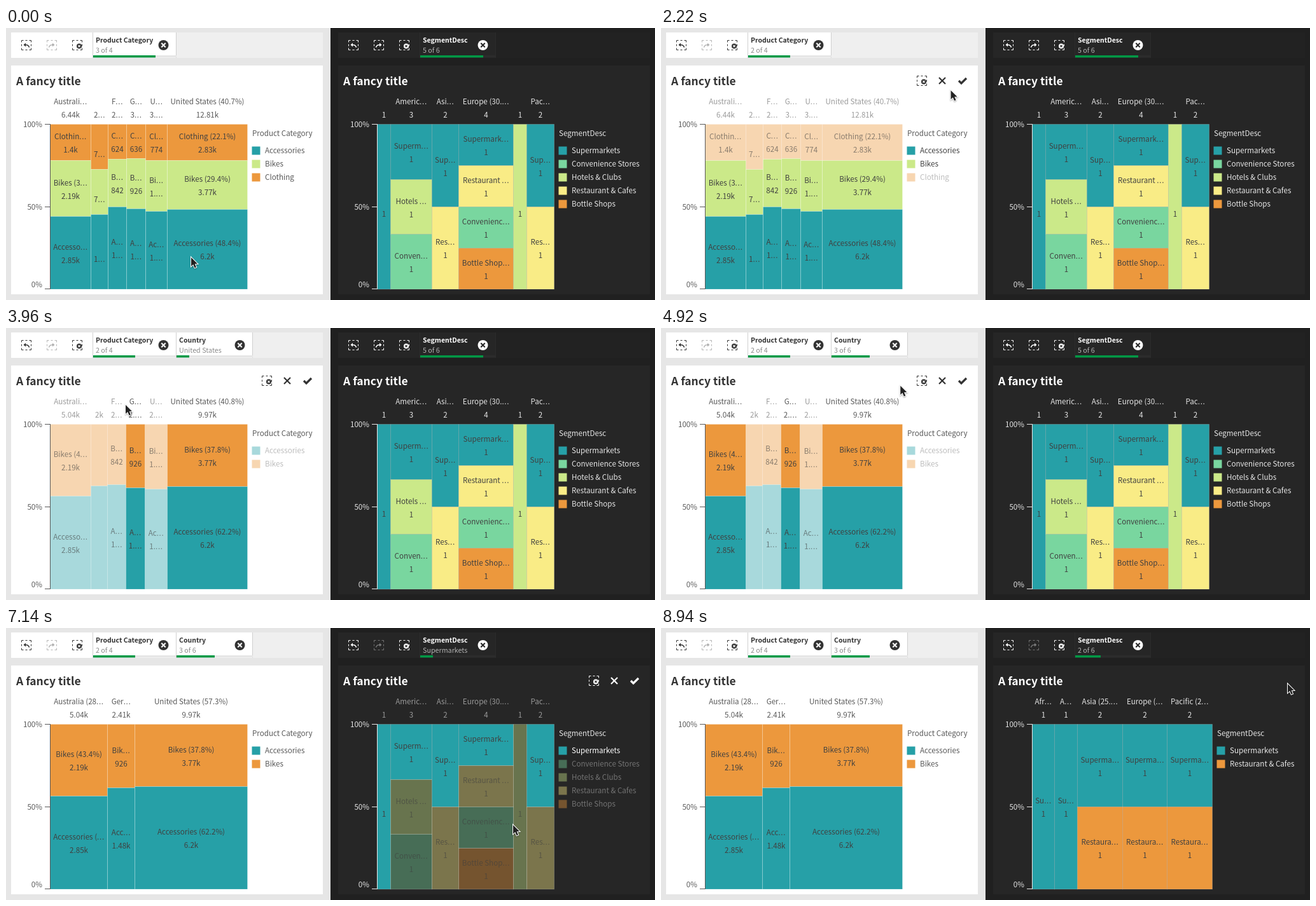
An HTML page with a canvas that plays this animation: 1020 by 428 pixels, repeating every 9 s.

```html
<!DOCTYPE html>
<html lang="en">
<head>
<meta charset="utf-8">
<title>Mekko chart selections</title>
<style>
  html, body { margin: 0; width: 100%; height: 100%; overflow: hidden; background: #e6e6e6; }
  canvas { display: block; }
</style>
</head>
<body>
<canvas id="stage" width="1020" height="428"></canvas>
<script>
const ctx = document.getElementById('stage').getContext('2d');
const LOOP = 9000, STEP = 60, TOP = 151, HEIGHT = 260;
const FAMILY = '"Noto Sans CJK SC", "Noto Sans CJK JP", "Noto Sans", sans-serif';
const TEAL = '#26a0a7', MINT = '#79d69f', LIME = '#cbe989', YELLOW = '#f9ec86', ORANGE = '#ec983d';

const LIGHT = { x: 0, page: '#e6e6e6', bar: '#efefef', tile: '#fff', card: '#fff', title: '#333',
  ink: '#404040', text: '#595959', sub: '#8c8c8c', line: '#d0d0d0', track: '#e6e6e6' };
const DARK = { x: 514, page: '#202020', bar: '#222', tile: '#262626', card: '#262626', title: '#fff',
  ink: '#fff', text: '#e6e6e6', sub: '#b3b3b3', line: '#2c2c2c', track: '#2c2c2c' };

// Column: weight, header, total, then cells of [height, category, label, value].
const col = (weight, header, total, ...cells) => ({ weight, header, total, cells });

const threeCategories = {
  width: 310, legend: [['Accessories', TEAL], ['Bikes', LIME], ['Clothing', ORANGE]],
  cols: [
    col(64, 'Australi…', '6.44k', [57, 2, 'Clothin…', '1.4k'], [88, 1, 'Bikes (3…', '2.19k'], [115, 0, 'Accesso…', '2.85k']),
    col(27, '', '2…', [71, 2, '', '7…'], [71, 1, '', '7…'], [118, 0, '', '1…']),
    col(29, 'F…', '2…', [55, 2, 'C…', '624'], [75, 1, 'B…', '842'], [130, 0, 'A…', '1…']),
    col(30, 'G…', '3…', [54, 2, 'C…', '636'], [79, 1, 'B…', '926'], [127, 0, 'A…', '1…']),
    col(34, 'U…', '3.…', [57, 2, 'Cl…', '774'], [80, 1, 'Bi…', '1.…'], [123, 0, 'Ac…', '1.…']),
    col(126, 'United States (40.7%)', '12.81k', [57, 2, 'Clothing (22.1%)', '2.83k'],
      [77, 1, 'Bikes (29.4%)', '3.77k'], [126, 0, 'Accessories (48.4%)', '6.2k'])
  ]
};
const twoCategories = {
  width: 310, legend: [['Accessories', TEAL], ['Bikes', ORANGE]],
  cols: [
    col(64, 'Australi…', '5.04k', [113, 1, 'Bikes (4…', '2.19k'], [147, 0, 'Accesso…', '2.85k']),
    col(26, '', '2k', [97, 1, '', ''], [163, 0, '', '']),
    col(29, 'F…', '2…', [95, 1, 'B…', '842'], [165, 0, 'A…', '1…']),
    col(30, 'G…', '2.…', [100, 1, 'B…', '926'], [160, 0, 'A…', '1.…']),
    col(35, 'U…', '2.…', [102, 1, 'Bi…', '1.…'], [158, 0, 'Ac…', '1.…']),
    col(126, 'United States (40.8%)', '9.97k', [98, 1, 'Bikes (37.8%)', '3.77k'], [162, 0, 'Accessories (62.2%)', '6.2k'])
  ]
};
const threeCountries = {
  width: 310, legend: twoCategories.legend,
  cols: [
    col(90, 'Australia (28…', '5.04k', [113, 1, 'Bikes (43.4%)', '2.19k'], [147, 0, 'Accessories (…', '2.85k']),
    col(43, 'Ger…', '2.41k', [100, 1, 'Bik…', '926'], [160, 0, 'Acc…', '1.48k']),
    col(177, 'United States (57.3%)', '9.97k', [98, 1, 'Bikes (37.8%)', '3.77k'], [162, 0, 'Accessories (62.2%)', '6.2k'])
  ]
};
const pair = (weight, header, first, second, cat) =>
  col(weight, header, '2', [130, 0, first, '1'], [130, cat, second, '1']);
const fiveSegments = {
  width: 278,
  legend: [['Supermarkets', TEAL], ['Convenience Stores', MINT], ['Hotels & Clubs', LIME],
    ['Restaurant & Cafes', YELLOW], ['Bottle Shops', ORANGE]],
  cols: [
    col(1, '', '1', [260, 0, '', '1']),
    col(3, 'Americ…', '3', [86.7, 0, 'Superm…', '1'], [86.7, 2, 'Hotels …', '1'], [86.6, 1, 'Conven…', '1']),
    pair(2, 'Asi…', 'Sup…', 'Res…', 3),
    col(4, 'Europe (30.…', '4', [65, 0, 'Supermark…', '1'], [65, 3, 'Restaurant …', '1'],
      [65, 1, 'Convenienc…', '1'], [65, 4, 'Bottle Shop…', '1']),
    col(1, '', '1', [260, 2, '', '1']),
    pair(2, 'Pac…', 'Sup…', 'Res…', 3)
  ]
};
const twoSegments = {
  width: 283, legend: [['Supermarkets', TEAL], ['Restaurant & Cafes', ORANGE]],
  cols: [
    col(1, 'Afr…', '1', [260, 0, 'Su…', '1']),
    col(1, 'A…', '1', [260, 0, 'Su…', '1']),
    pair(2, 'Asia (25.…', 'Superma…', 'Restaura…', 1),
    pair(2, 'Europe (…', 'Superma…', 'Restaura…', 1),
    pair(2, 'Pacific (2…', 'Superma…', 'Restaura…', 1)
  ]
};

// Hard state changes: [time, value].
const leftChart = [[0, threeCategories], [2520, twoCategories], [5340, threeCountries]];
const rightChart = [[0, fiveSegments], [8400, twoSegments]];
const leftPick = [[0, null], [480, { cats: [0] }], [1560, { cats: [0, 1] }], [2520, null],
  [3480, { cols: [5] }], [3900, { cols: [5, 3] }], [4440, { cols: [5, 3, 0] }], [5340, null]];
const rightPick = [[0, null], [6420, { cats: [0] }], [7440, { cats: [0, 3] }], [8400, null]];
const categoryTile = [[0, ['3 of 4', 3 / 4]], [660, ['Accessories', 1 / 4]], [1740, ['2 of 4', 2 / 4]]];
const countryTile = [[0, null], [3660, ['United States', 1 / 6]], [4080, ['2 of 6', 2 / 6]], [4620, ['3 of 6', 3 / 6]]];
const segmentTile = [[0, ['5 of 6', 5 / 6]], [6600, ['Supermarkets', 1 / 6]], [7620, ['2 of 6', 2 / 6]]];
const cursorPath = [[0, 291, 361], [600, 291, 361], [1260, 288, 281], [1500, 288, 246], [1740, 288, 246],
  [2340, 475, 81], [2940, 476, 81], [3400, 315, 118], [3560, 315, 118], [3860, 188, 121], [4020, 188, 121],
  [4380, 100, 120], [4560, 100, 120], [5100, 473, 81], [5400, 473, 81], [5760, 442, 105], [6300, 752, 185],
  [6540, 752, 185], [7140, 797, 310], [7360, 838, 345], [7560, 838, 345], [8200, 990, 82], [8500, 990, 84],
  [8940, 985, 88], [9000, 985, 88]];

const at = (steps, t) => steps.filter(s => s[0] <= t).pop()[1];

function rect(x, y, w, h, color) {
  ctx.fillStyle = color;
  ctx.fillRect(x, y, w, h);
}

function line(points, color, width) {
  ctx.beginPath();
  points.forEach(p => ctx.lineTo(...p));
  ctx.strokeStyle = color;
  ctx.lineWidth = width;
  ctx.stroke();
}

// align: 0 left, 0.5 centre, 1 right. A trailing ellipsis is set as baseline dots.
function text(str, x, y, color, align = 0, size = 13, weight = 400) {
  if (!str) return;
  const body = str.replace('…', ''), dots = body === str ? 0 : 3, pitch = size * 0.3;
  ctx.font = `${weight} ${size * 0.895}px ${FAMILY}`;
  ctx.fillStyle = color;
  const width = ctx.measureText(body).width;
  x -= (width + dots * pitch) * align;
  ctx.fillText(body, x, y);
  for (let i = 0; i < dots; i++) ctx.fillText('.', x + width + i * pitch, y);
}

function faded(alpha, draw) {
  ctx.globalAlpha = alpha;
  draw();
  ctx.globalAlpha = 1;
}

function cross(x, y, r, color, width) {
  line([[x - r, y - r], [x + r, y + r]], color, width);
  line([[x + r, y - r], [x - r, y + r]], color, width);
}

function disc(x, y, r, color, back, width) {
  ctx.beginPath();
  ctx.arc(x, y, r, 0, 7);
  ctx.fillStyle = color;
  ctx.fill();
  cross(x, y, r * 0.4, back, width);
}

function dashedBox(x, y, color) {
  ctx.strokeStyle = color;
  ctx.lineWidth = 1;
  ctx.setLineDash([3, 3, 3, 3, 3, 0]);
  ctx.strokeRect(x - 7.5, y - 7.5, 15, 15);
  ctx.setLineDash([]);
}

function arrowIcon(x, y, color, dir) {
  dashedBox(x, y, color);
  ctx.save();
  ctx.translate(x, y);
  ctx.scale(dir, 1);
  ctx.beginPath();
  ctx.moveTo(-4.5, -0.5);
  ctx.lineTo(-1, -3.5);
  ctx.lineTo(-1, 2.5);
  ctx.fillStyle = color;
  ctx.fill();
  ctx.beginPath();
  ctx.moveTo(-2, -0.5);
  ctx.quadraticCurveTo(3.5, -1, 4.5, 3.5);
  ctx.lineWidth = 1.6;
  ctx.stroke();
  ctx.restore();
}

function clearIcon(x, y, color, back) {
  dashedBox(x, y, color);
  disc(x + 3, y + 1.5, 4, color, back, 1.2);
}

function tile(theme, x, width, name, [value, share]) {
  rect(x, 7, width, 40, theme.tile);
  rect(x - 1, 7, 1, 40, theme.line);
  rect(x + width - 1, 7, 1, 40, theme.line);
  rect(x, 43, width, 3.5, theme.track);
  rect(x, 43, Math.round(width * share), 3.5, '#009845');
  text(name, x + 4, 23, theme.title, 0, 11.75, 700);
  text(value, x + 4, 39, theme.sub, 0, 12);
  disc(x + width - 20.5, 27, 8, theme.title, theme.tile, 2);
}

function panel(theme, canRedo) {
  const { x } = theme;
  rect(x ? 510 : 0, 0, 510, 428, theme.page);
  rect(x + 8, 7, 490, 40, theme.bar);
  rect(x + 8, 7, 129, 40, theme.tile);
  rect(x + 8, 59, 490, 360, theme.card);
  arrowIcon(x + 32, 27, theme.title, 1);
  faded(canRedo ? 1 : 0.35, () => arrowIcon(x + 72, 27, theme.title, -1));
  clearIcon(x + 112, 27, theme.title, theme.tile);
  text('A fancy title', x + 16, 90, theme.title, 0, 19.5, 700);
}

function toolbar({ x, title, card }) {
  clearIcon(x + 410, 83, title, card);
  cross(x + 442, 83, 5, title, 2.2);
  line([[x + 468, 83], [x + 472, 87], [x + 480, 79]], title, 3.2);
}

function cell(x, y, w, h, color, alpha) {
  faded(alpha, () => rect(x, y, w, h, color));
  ctx.strokeStyle = 'rgba(255,255,255,.2)';
  ctx.lineWidth = 1;
  ctx.strokeRect(x, y, w, h);
}

function chart(theme, { cols, legend, width }, pick, legendTitle) {
  const left = theme.x + 69;
  const total = cols.reduce((sum, c) => sum + c.weight, 0);
  const catOn = i => !pick || !!pick.cats && pick.cats.includes(i);
  const colOn = i => !pick || !!pick.cols && pick.cols.includes(i);
  let used = 0;

  cols.forEach((c, i) => {
    const x = Math.round(left + used / total * width) + 0.5;
    used += c.weight;
    const right = Math.round(left + used / total * width) + 0.5, mid = (x + right) / 2;
    faded(colOn(i) ? 1 : 0.6, () => {
      text(c.header, mid, 120, theme.text, 0.5);
      text(c.total, mid, 141, theme.text, 0.5);
    });
    let offset = TOP;
    c.cells.forEach(([height, cat, label, value]) => {
      const y = Math.round(offset) + 0.5;
      offset += height;
      const bottom = Math.round(offset) + (offset < TOP + HEIGHT - 1 ? 0.5 : 0);
      const baseline = Math.round((y + bottom) / 2) - 5;
      const on = catOn(cat) || colOn(i);
      cell(x, y, right - x, bottom - y, legend[cat][1], on ? 1 : 0.4);
      faded(on ? 1 : 0.6, () => {
        text(label, mid, baseline, '#404040', 0.5);
        text(value, mid, baseline + 21, '#404040', 0.5);
      });
    });
  });

  rect(left, TOP, 1, HEIGHT, theme.text);
  [['100%', TOP, 156], ['50%', 281, 286], ['0%', 410, 408]].forEach(([label, y, baseline]) => {
    rect(left - 8, y, 8, 1, theme.text);
    text(label, left - 12, baseline, theme.text, 1);
  });

  const legendX = left + width + 8;
  text(legendTitle, legendX, 170, theme.text);
  legend.forEach(([name, color], i) => faded(catOn(i) ? 1 : 0.4, () => {
    rect(legendX - 0.5, 186.5 + i * 21, 13, 13, color);
    text(name, legendX + 20, 197 + i * 21, pick && catOn(i) ? theme.ink : theme.text);
  }));
  if (pick) toolbar(theme);
}

function cursor(t) {
  const i = cursorPath.findIndex(p => p[0] > t);
  const [t0, x0, y0] = cursorPath[i - 1], [t1, x1, y1] = cursorPath[i];
  const u = (t - t0) / (t1 - t0), e = u * u * (3 - 2 * u);
  ctx.save();
  ctx.translate(x0 + (x1 - x0) * e, y0 + (y1 - y0) * e);
  ctx.beginPath();
  [[0, 0], [0, 14], [3.2, 11], [5.6, 16.4], [8, 15.4], [5.7, 10.2], [10, 10]].forEach(p => ctx.lineTo(...p));
  ctx.closePath();
  ctx.shadowColor = 'rgba(0,0,0,.35)';
  ctx.shadowBlur = 2;
  ctx.shadowOffsetY = 1;
  ctx.strokeStyle = '#fff';
  ctx.lineWidth = 2;
  ctx.stroke();
  ctx.shadowColor = 'transparent';
  ctx.fillStyle = '#222';
  ctx.fill();
  ctx.restore();
}

function draw() {
  const t = Math.floor(performance.now() % LOOP / STEP) * STEP;
  const country = at(countryTile, t);
  panel(LIGHT, false);
  tile(LIGHT, 137, 131, 'Product Category', at(categoryTile, t));
  if (country) tile(LIGHT, 268, 120, 'Country', country);
  chart(LIGHT, at(leftChart, t), at(leftPick, t), 'Product Category');

  panel(DARK, t < 6600);
  tile(DARK, 651, 119, 'SegmentDesc', at(segmentTile, t));
  chart(DARK, at(rightChart, t), at(rightPick, t), 'SegmentDesc');

  cursor(t);
  requestAnimationFrame(draw);
}
draw();
</script>
</body>
</html>
```
